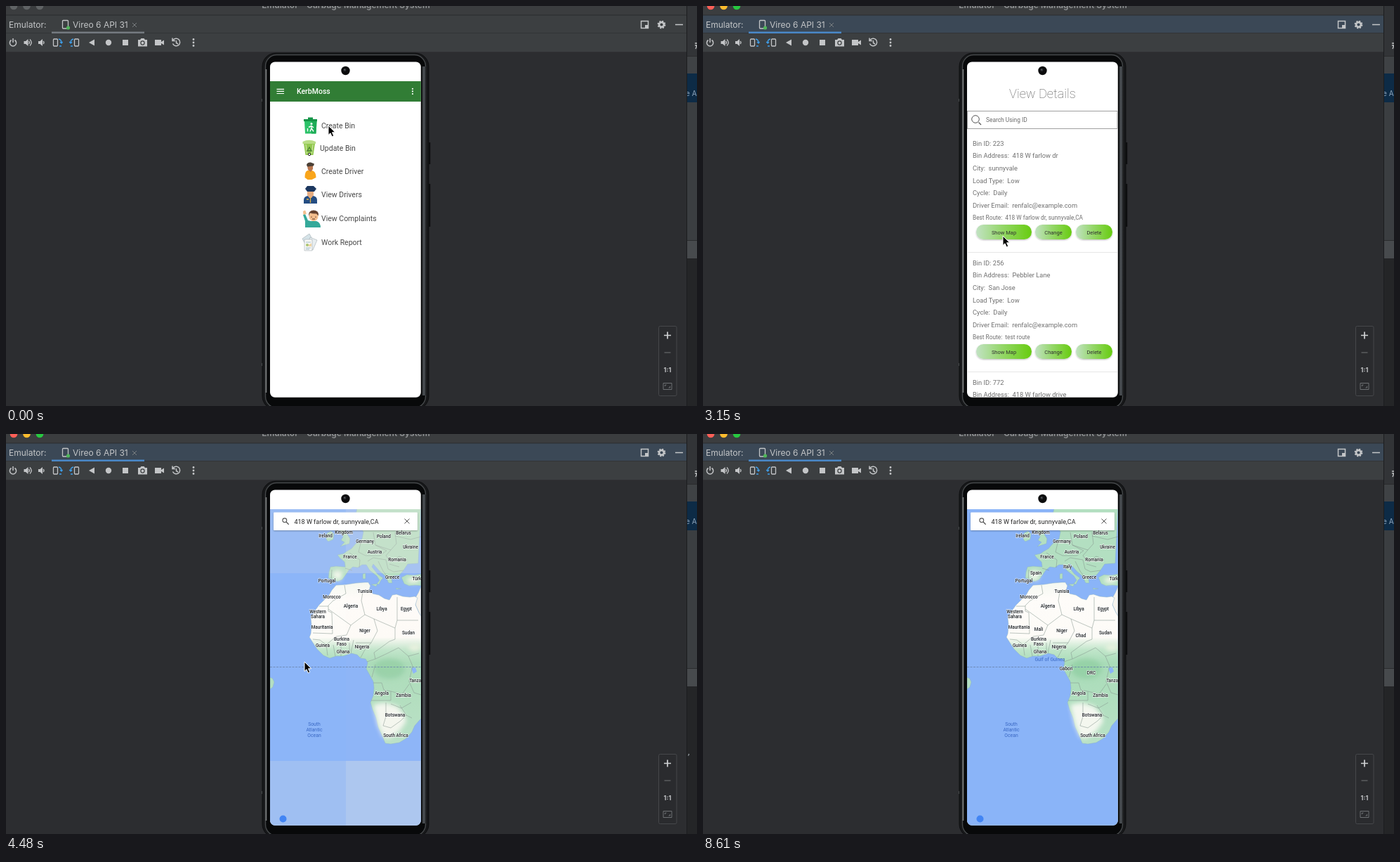
An HTML page for the animation above (9170 ms loop, 984 px wide and 569 px high).

```html
<!DOCTYPE html>
<html lang="en">
<head>
<meta charset="utf-8">
<title>Emulator</title>
<style>
  html, body { margin: 0; width: 100%; height: 100%; overflow: hidden; background: #2c2d30; }
  svg { display: block; width: 100%; height: 100%; }
  text { white-space: pre; font-family: Roboto, sans-serif; }
  .ui { font: 12px Inter, sans-serif; fill: #c3c5c7; }
  .code { font: 11px "DejaVu Sans Mono", monospace; fill: #9da4ab; }
  .menu { font-size: 10.5px; fill: #484848; }
  .row { font-size: 9.3px; fill: #6f6f6f; }
  .route { font-size: 8.3px; fill: #6f6f6f; }
  .btn { font-size: 7.5px; fill: #303030; text-anchor: middle; }
  .place { font-size: 6.4px; font-weight: 500; fill: #1f2326; text-anchor: middle;
    stroke: #fff; stroke-opacity: .75; stroke-width: 1.3px; paint-order: stroke; }
  .sea { font-size: 6.8px; fill: #3a68c4; text-anchor: middle; }
  .line { fill: none; stroke: #c3c5c7; stroke-width: 1.3; }
</style>
</head>
<body>
<svg viewBox="0 0 984 569" preserveAspectRatio="none">
  <defs>
    <clipPath id="screen"><rect x="376" y="79.500" width="214.800" height="477.200" rx="7"/></clipPath>
    <clipPath id="mapArea"><rect x="376" y="107" width="215" height="450"/></clipPath>
    <linearGradient id="lime"><stop offset="0" stop-color="#c2e2c3"/><stop offset=".45" stop-color="#96d76c"/><stop offset="1" stop-color="#67cc10"/></linearGradient>
    <linearGradient id="rim"><stop offset="0" stop-color="#2b2e30"/><stop offset=".5" stop-color="#50555a"/><stop offset="1" stop-color="#202224"/></linearGradient>
    <linearGradient id="africa" gradientUnits="userSpaceOnUse" x1="0" y1="211" x2="0" y2="441">
      <stop offset="0" stop-color="#f4f8f1"/><stop offset=".1" stop-color="#fefcf9"/><stop offset=".34" stop-color="#fdfbf7"/>
      <stop offset=".42" stop-color="#bfe5c9"/><stop offset=".5" stop-color="#a9dcb8"/><stop offset="1" stop-color="#b9e1c6"/>
    </linearGradient>
    <filter id="soft"><feGaussianBlur stdDeviation="3"/></filter>
    <filter id="shade" x="-10%" y="-20%" width="120%" height="150%"><feDropShadow dx="0" dy="1" stdDeviation="1" flood-opacity=".28"/></filter>
  </defs>

  <!-- window behind -->
  <rect x="969" width="15" height="569" fill="#2a2b2d"/>
  <rect x="970" width="14" height="71" fill="#323437"/>
  <rect x="970" y="72" width="14" height="24" fill="#3f4245"/>
  <rect x="970" y="96" width="14" height="41" fill="#0d2b46"/>
  <rect x="970" y="137" width="14" height="196" fill="#3b3e41"/>
  <rect x="970" y="334" width="14" height="25" fill="#474a4d"/>
  <rect x="970" y="359" width="14" height="210" fill="#242527"/>
  <text class="ui" x="968" y="128" style="font-size:10px;fill:#8fa6bd">e Al</text>
  <path d="M981 53h3M981 56h3l-2 5" class="line"/>
  <g id="codeText" class="code"><text x="970" y="450">ti</text><text x="970" y="491">ot:</text><text x="970" y="511">e_:</text><text x="970" y="532">ex</text></g>
  <text id="comma" class="code" x="969" y="457">,</text>

  <!-- window chrome -->
  <rect width="969" height="13" fill="#3b3d3f"/>
  <g id="lights"><circle cx="11" r="5.300"/><circle cx="29.500" r="5.300"/><circle cx="48" r="5.300"/></g>
  <text class="ui" x="484" y="3" text-anchor="middle" style="font-weight:600;fill:#929496">Emulator – Garbage Management System</text>
  <rect y="12.500" width="969" height="1" fill="#2b2d2f"/>
  <rect id="tabBar" y="13.500" width="969" height="25"/>
  <rect y="38.500" width="969" height="27" fill="#3c3f41"/>
  <path d="M0 38.500H969" stroke="#323436"/>
  <rect id="underline" x="65" y="36.500" width="132" height="2.500"/>
  <text class="ui" x="4" y="31">Emulator:</text>
  <text class="ui" x="95" y="31">Vireo 6 API 31</text>
  <rect class="line" x="80.500" y="20.500" width="8" height="11.500" rx="1"/>
  <circle cx="88.500" cy="31" r="2.600" fill="#4fb65a"/>
  <path d="M180 24l6 6m0-6l-6 6" stroke="#7b7f82" fill="none"/>
  <g class="line">
    <path d="M904.500 21.500h10v10h-10zM953 26.500h11" stroke-width="1.500"/>
    <circle cx="933.500" cy="26.500" r="3.400" stroke-width="2.600"/>
    <circle cx="933.500" cy="26.500" r="5" stroke-width="1.800" stroke-dasharray="2.200 1.730"/>
    <path d="M7.500 48.500a4.600 4.600 0 1 0 5 0M10 46v6" stroke-width="1.500"/>
    <path d="M32.500 50q2 2 0 4M34 47.500q4.500 4.500 0 9M53 50q2 2 0 4"/>
    <rect x="67.500" y="47" width="6" height="10" rx="1"/><path d="M75 47q4.500 1 4 6m-2-2l2 2 1.500-2M79 57h-3" stroke="#3f9ee8"/>
    <rect x="97.500" y="47" width="6" height="10" rx="1"/><path d="M96 47q-4.500 1-4 6m-1.800-2l2 2 1.800-2M92 57h3" stroke="#3f9ee8"/>
    <path d="M238 48.500a5.300 5.300 0 1 1-.5 5M237 45.500v4h4M242.500 49v3.500l2.500 1.500" stroke-width="1.500"/>
  </g>
  <g fill="#c3c5c7">
    <path d="M910 27h5v5h-5zM25.500 50h2.500l3.500-3v10l-3.500-3h-2.500zM46 50h2.500l3.500-3v10l-3.500-3H46zM118 52l8-4.500v9zM166 48h8v8h-8zM212 48h9v3l4-2.500v7l-4-2.500v3h-9z"/>
    <circle cx="146" cy="52" r="4.200"/>
    <path d="M188 48h3l1.500-2h4l1.500 2h3v9.500h-13z"/><circle cx="194.500" cy="52.500" r="2.600" fill="#c3c5c7" stroke="#3c3f41" stroke-width="1.200"/>
    <circle cx="267" cy="47.500" r="1.400"/><circle cx="267" cy="52" r="1.400"/><circle cx="267" cy="56.500" r="1.400"/>
  </g>
  <rect y="65.500" width="969" height="504" fill="#2c2d30"/>
  <path d="M969.500 0V569" stroke="#1c1d1f"/>

  <!-- zoom controls -->
  <rect x="929.500" y="455.500" width="25.500" height="99" rx="2" fill="#2a2b2e" stroke="#46484b"/>
  <path d="M937 468.500h10M942 463.500v10" stroke="#d0d2d4" stroke-width="1.700"/>
  <path d="M937.500 493h9" stroke="#66696c" stroke-width="1.200"/>
  <text class="ui" x="942" y="520.500" text-anchor="middle" style="font-size:9px;font-weight:700">1:1</text>
  <path d="M936 536.500h12v9h-12zM938.500 541v-2h2M945.500 541v2h-2" fill="none" stroke="#6d7073"/>

  <!-- phone -->
  <path d="M603 194v31M603 253v61" stroke="#0d0e0f" stroke-width="2.500"/>
  <rect x="365" y="67" width="237" height="507" rx="19" fill="#17181a" stroke="#0d0e0f"/>
  <rect x="369.500" y="69.500" width="228" height="502" rx="16" fill="#08090a" stroke="#45484a" stroke-width="1.400"/>
  <path d="M370.500 90V550" stroke="#7a7d7e" stroke-width="1.600"/>
  <rect x="592.500" y="86" width="5.500" height="468" fill="url(#rim)"/>
  <path d="M364.500 132v4M364.500 508v4" stroke="#45484a"/>

  <g clip-path="url(#screen)">
    <g id="menuPage">
      <rect x="366" y="70" width="236" height="500" fill="#fff"/>
      <rect x="376" y="107" width="215" height="29" fill="#317d35"/>
      <path d="M385.500 118.300h10.500M385.500 121.400h10.500M385.500 124.500h10.500" stroke="#fff" stroke-width="1.200"/>
      <text x="414" y="125" style="font-size:10.500px;font-weight:500;fill:#fff">KerbMoss</text>
      <g fill="#fff"><circle cx="579" cy="117.800" r="1.100"/><circle cx="579" cy="121.400" r="1.100"/><circle cx="579" cy="125" r="1.100"/></g>
      <!-- bins -->
      <path d="M424 161h19v3h-19zM430 158.500h7v3h-7z" fill="#159548"/><path d="M425 164h17.500l-1 17.500h-15.500z" fill="#2bc268"/><path d="M435 164h7.500l-1 17.500h-6.500z" fill="#1dac57"/>
      <circle cx="435" cy="167.500" r="1.500" fill="#fff"/><path d="M435 170v4l-2 4.500M435 174l3 4.500M431 172.500l4-2 3 2.500M429.500 174v4.500" stroke="#fff" stroke-width="1.400" fill="none"/>
      <path d="M424 196h16l-2.500 16h-11z" fill="#93c950"/><path d="M422.500 193q9-4.500 18.500 0v3h-18.500z" fill="#b9dd86"/><path d="M427 197l1.500 13M437 197l-1.500 13" stroke="#d5eab3"/>
      <path d="M429 206l3-5 3 5z" fill="none" stroke="#488330" stroke-width="1.400"/><circle cx="432" cy="211" r="1.700" fill="#fff" stroke="#222"/>
      <!-- people -->
      <path d="M425.500 244q0-9 4-10h6q6 1 6 10l-6 3h-6z" fill="#f9a51b"/><path d="M429 227h8v5l-3 4-4-3z" fill="#b9764f"/><path d="M428 226q1-4 6-3.500l5 2-1 3-9 1z" fill="#4b4036"/>
      <path d="M424 281v-5q0-5 6-6h7q6 1 6 6v5z" fill="#244d83"/><path d="M429 264h9v5l-3 4h-3l-3-4z" fill="#e6ad82"/><path d="M426 260l3-4h9l4 4-3 4h-10z" fill="#1c375f"/><path d="M433.500 272v8M428 275h3" stroke="#e5b648" stroke-width="1.300"/>
      <path d="M426 315v-9l-3-9 3-1 4 9 4 1h8q6 2 6 9z" fill="#35a99a"/><path d="M423.500 297l-.5-5 3-1.500 2 5z" fill="#f4be8d"/><circle cx="438" cy="299.500" r="6.500" fill="#f4be8d"/><path d="M431 299q-1-8 7-8.500 8 .5 7 8l-3-3q-6 0-9-1z" fill="#654230"/><path d="M435 299.500v1.500M441 299.500v1.500M436 303h4" stroke="#5b3428"/>
      <!-- documents -->
      <g stroke="#a3adb2" stroke-width=".6"><path d="M422 331l10-7 7 13-10 7z" fill="#d5e3e8"/><path d="M433 329l10 4-6 14-9-4z" fill="#e8eef0"/><path d="M425 332h11v16h-11z" fill="#f7f8f6"/></g>
      <path d="M427 336h7M427 344h7M427 346h5" stroke="#8eb0c0" stroke-width=".8"/><circle cx="429" cy="340" r="2" fill="#a9c46e"/><path d="M432 342v-3M434 342v-4" stroke="#eab254"/>
      <g id="menuText"></g>
    </g>
    <rect id="menuScrim" x="366" y="70" width="236" height="500"/>

    <g id="listPage">
      <rect x="376" y="79" width="215" height="478" fill="#fff"/>
      <text x="483.500" y="131" text-anchor="middle" style="font-size:18.200px;font-weight:100;fill:#555">View Details</text>
      <rect x="376.500" y="149.500" width="213.500" height="25" fill="#fff" stroke="#a0a0a0"/>
      <path d="M392.500 165.500l3.500 3.500" stroke="#555" stroke-width="1.200"/><circle cx="388" cy="161" r="5.300" fill="none" stroke="#555"/>
      <text x="403" y="165" style="font-size:8.400px;fill:#6a6a6a">Search Using ID</text>
      <g id="cards"></g>
      <rect id="press" x="389" y="311" width="79" height="21" rx="10.500" fill="#174000"/>
    </g>
    <rect id="listScrim" x="366" y="70" width="236" height="500"/>

    <g id="mapPage">
      <rect x="376" y="79" width="215" height="478" fill="#fff"/>
      <g clip-path="url(#mapArea)">
        <rect x="376" y="107" width="215" height="450" fill="#8ab4f8"/>
        <g id="land" stroke="#87afc9" stroke-width=".5" fill="#b3dfc1">
          <path d="M376 346l4 2 2 5-2 7-4 3z"/>
          <path d="M457 141l6-3 4 4-1 8-7 3-3-3zM474 134l8-2 3 9 5 8-1 7-13 4 6-6-5-3 3-5z"/>
          <path d="M591 105H500l-4 20 9 9 4 5-2 10-9 7-6 7-7 4-4 3-9 2 3 4 7 6 1 7-13-1-8 1-2 7-1 9 7 2 6 3 7-3 5-7 4-6 6-5 7 1 6-4 6 0 5 8 10 8 4 6-4 5 3 1 3-6 3-3-8-6-8-10 2-4 9 10 8 7 5 10 5 0-1-7 2-3 9-1 6-7 6-9 15-1z"/>
          <path d="M563 204l8-4 10 1 10-2v17l-8-1-9 1-7-3zM520 214l9-1-2 4zM508 199l4-1 0 8-4 0zM555 219l8 1-7 1z"/>
          <path d="M583 233l4-7 4-9v44l-8-18z" fill="#f6f3ec"/>
          <path id="coast" fill="url(#africa)" d="M470 215l-6 7-4 7-7 7-7 7-6 8-6 11 1 10-1 12-2 5 5 8 6 9 9 9 9 4 9-3h10l12-4 8 2 5 5 7 1 3 5-2 9 5 9 5 9 1 9-1 11-4 10 3 10 5 12 3 13 6 13 4 10 8 1 12-2 10-6 8-9 4-9 6-7 6-6V264l-6-10-5-11 3-10-4-2-7 1-10-1-9-3-6 1-4 7-7-2-8-5-9-2-5-5 2-6-3-5h-5l-13 1-13 2z"/>
        </g>
        <g filter="url(#soft)">
          <ellipse cx="546" cy="334" rx="22" ry="14" fill="#8dceA0" opacity=".7"/>
          <path d="M523 385l16-3 18 5 10 12 3 10-10 14-15 10-8-2-8-18z" fill="#fbfaf4" opacity=".9"/>
          <ellipse cx="582" cy="304" rx="9" ry="5" fill="#e8f2df"/>
          <path d="M462 200l10-7 8 5-5 12z" fill="#f2f6eb"/>
          <ellipse cx="580" cy="208" rx="9" ry="4" fill="#f4f6ec"/>
        </g>
        <path d="M577 333l6-1 2 6-5 3z" fill="#8ab4f8"/>
        <g fill="none" stroke="#879690" stroke-width=".55">
          <path d="M482 215l2 12-18 10-7 7v5l32 23 20-15-5-20 2-12M446 245h13M459 249v3l5 2 1 30-28-1M437 292l10 1 9 7 14-12 15-2 6-14M495 293l-4 19M511 257l13 6 5 17-9 17h-22M524 263l30 13v16l-8 3M557 232v33h30M554 276l3-11"/>
          <path d="M520 297l-9 10-6 11M546 295l-22 16 2 9-12 4M526 320l17-8 16-8 14 12 15-4M526 328l-5 18M573 316l6 14-5 22M523 354l12 0 3 10 10 2v13h-28M548 366l16 4 10-14M548 384l15 6 14-8M541 382v20l-4 13 11 3 14-10 8-8-9-14M574 352l7 16 10 3M570 400l8 4M466 300l3 16M477 298v18M489 297v15M456 300l2 15"/>
          <path d="M464 193l-1 18M483 191l10 3M489 169l15 10-1 11M506 151l-4 17 10 5h20l10-7-16-8-3-18M526 158l22 7 8-9-2-16M548 165l-7 8 7 9 12-8 11 5M515 181l8-5 18 3 3 13 8 4 14-2M554 145l22 5 15-4M530 181l7 14 6 8M546 185l14 4"/>
        </g>
        <path d="M376 331.500H591" stroke="#6782aa" stroke-width=".8" stroke-dasharray="3 1.500"/>
        <g id="tiles" fill="#ece8e0"></g>
        <g id="places"></g>
        <g id="latePlaces"></g>
        <circle cx="394.500" cy="547.500" r="5" fill="#4285f4"/>
      </g>
      <rect x="381" y="111.500" width="205" height="25.500" rx="1" fill="#fff" filter="url(#shade)"/>
      <circle cx="396.800" cy="122.800" r="2.900" fill="none" stroke="#555" stroke-width="1.100"/><path d="M399 125l3.700 3.700" stroke="#555" stroke-width="1.300"/>
      <text x="410.500" y="127.700" style="font-size:9px;fill:#252525">418 W farlow dr, sunnyvale,CA</text>
      <path d="M567.500 120.500l7 7m0-7l-7 7" stroke="#555"/>
    </g>
    <circle cx="483.500" cy="92" r="6.200" fill="#0b0c0d"/><circle cx="482.500" cy="91" r="2" fill="#2c3034"/><circle cx="482" cy="90.500" r=".7" fill="#777"/>
  </g>

  <path id="cursor" d="M0 0V13.500L3 10.800 5.200 15.800 7.700 14.700 5.500 9.800H9.700Z" fill="#000" stroke="#fff" stroke-width="1"/>
</svg>
<script>
const $ = id => document.getElementById(id);
const LOOP = 9170, STEP = 70;
const clamp = v => Math.max(0, Math.min(1, v));
const text = (cls, x, y, s) => `<text class="${cls}" x="${x}" y="${y}">${s}</text>`;
const show = (id, on) => $(id).setAttribute('display', on ? 'inline' : 'none');
const fade = (id, a) => $(id).setAttribute('opacity', a);
const zoom = (id, s) => $(id).setAttribute('transform', `translate(483.5 320) scale(${s}) translate(-483.5 -320)`);

$('menuText').innerHTML = [['Create Bin', 174], ['Update Bin', 206], ['Create Driver', 239],
  ['View Drivers', 272], ['View Complaints', 306], ['Work Report', 340]]
  .map(([s, y]) => text('menu', s === 'Update Bin' ? 447 : 449, y, s)).join('');

const button = (x, w, label) =>
  `<rect x="${x}" y="311" width="${w}" height="21" rx="10.5" fill="url(#lime)" filter="url(#shade)"/>` +
  text('btn', x + w / 2, 324.5, label);

function card([id, address, city, route], i) {
  const rows = ['Bin ID: ' + id, 'Bin Address:  ' + address, 'City:  ' + city, 'Load Type:  Low',
    'Cycle:  Daily', 'Driver Email:  renfalc@example.com'];
  return `<g transform="translate(0 ${i * 170})">` +
    rows.map((s, n) => text('row', 384, 198.5 + n * 17.7, s)).join('') +
    text('route', 384, 303.7, 'Best Route:  ' + route) +
    button(389, 79, 'Show Map') + button(473, 52, 'Change') + button(531, 52, 'Delete') +
    '<path d="M377 350.5H590" stroke="#e6e6e6"/></g>';
}
$('cards').innerHTML = [
  [223, '418 W farlow dr', 'sunnyvale', '418 W farlow dr, sunnyvale,CA'],
  [256, 'Pebbler Lane', 'San Jose', 'test route'],
  [772, '418 W farlow drive', 'sunnyvale', 'test route']
].map(card).join('');

const place = ([s, x, y, cls = 'place']) => text(cls, x, y + 2.3, s);
$('places').innerHTML = [
  ['Ireland', 455, 145], ['Kingdom', 481, 140], ['Germany', 511, 153], ['Poland', 538, 146], ['Belarus', 566, 141],
  ['Ukraine', 576, 161], ['Austria', 525, 168], ['France', 490, 175], ['Romania', 557, 179], ['Greece', 550, 204],
  ['Portugal', 457, 209], ['Türkiye', 589, 206], ['Tunisia', 511, 224], ['Morocco', 464, 232], ['Algeria', 491, 245],
  ['Libya', 535, 249], ['Egypt', 570, 249], ['Western', 444, 253], ['Sahara', 444, 260], ['Mauritania', 450, 275],
  ['Niger', 511, 280], ['Sudan', 573, 283], ['Burkina', 478, 292], ['Faso', 478, 299], ['Guinea', 451, 301],
  ['Nigeria', 507, 303], ['Ghana', 480, 310], ['Tanzania', 587, 351], ['Angola', 535, 369], ['Zambia', 566, 372],
  ['Botswana', 554, 400], ['South Africa', 555, 429],
  ['South', 439, 413, 'sea'], ['Atlantic', 439, 421, 'sea'], ['Ocean', 439, 429, 'sea']
].map(place).join('');
$('latePlaces').innerHTML = [
  ['Spain', 474, 198], ['Italy', 519, 189], ['Mali', 478, 278], ['Chad', 538, 287],
  ['Gabon', 517, 334], ['DRC', 553, 340], ['Gulf of Guinea', 494, 321, 'sea']
].map(place).join('');

// Map tiles: x, y, width, height, veil left at 4480 ms
const tiles = [[376, 107, 108, 91, .17], [484, 107, 107, 91, .3], [376, 198, 108, 267, .02],
  [484, 198, 107, 267, .04], [376, 465, 108, 92, .22], [484, 465, 107, 92, .36]];
$('tiles').innerHTML = tiles.map(([x, y, w, h]) => `<rect x="${x}" y="${y}" width="${w}" height="${h}"/>`).join('');
const veils = [...$('tiles').children];

// Pointer stops: time, x, y
const stops = [[0, 459, 170], [350, 466, 215], [630, 480, 285], [980, 466, 202], [1190, 466, 202],
  [1610, 558, 226], [1750, 558, 226], [2030, 445, 227], [2240, 445, 227], [2450, 438, 340], [2730, 438, 340],
  [2940, 432, 329], [3010, 432, 329], [3150, 427, 327], [3710, 427, 327], [3780, 421, 323], [3850, 425, 324],
  [5040, 425, 324], [5320, 577, 138], [5530, 552, 215], [5810, 552, 215], [6160, 540, 462], [6440, 458, 340],
  [6790, 517, 203], [7070, 495, 181], [7350, 462, 305], [7630, 517, 218], [7840, 517, 218], [8050, 332, 410],
  [8260, 493, 551], [8470, 493, 551], [8610, 496, 580], [LOOP, 496, 580]];

function pointer(t) {
  const i = stops.findIndex(s => s[0] > t);
  const [t0, x0, y0] = stops[i - 1], [t1, x1, y1] = stops[i];
  const u = (t - t0) / (t1 - t0), e = u * u * (3 - 2 * u);
  return [x0 + (x1 - x0) * e, y0 + (y1 - y0) * e];
}

// A new page grows into place while the old one swells and dims.
function openPage(t, start, from, oldId, scrimId, newId) {
  const on = t >= from, u = clamp((t - start) / 450), e = on ? 1 - (1 - u) ** 4 : 0;
  show(oldId, e < 1);
  zoom(oldId, 1 + .05 * e);
  fade(scrimId, e < 1 ? .1 * e : 0);
  show(newId, on);
  zoom(newId, .85 + .15 * e);
  fade(newId, clamp(u * 6));
}

function draw(now) {
  const t = Math.floor((now % LOOP) / STEP) * STEP;
  const active = t >= 280;
  ['#ff5f57', '#febc2e', '#28c840'].forEach((c, i) =>
    $('lights').children[i].setAttribute('fill', active ? c : '#606365'));
  $('tabBar').setAttribute('fill', active ? '#3b4856' : '#3c3f41');
  $('underline').setAttribute('fill', active ? '#4a88c7' : '#747a80');

  openPage(t, 1470, 1470, 'menuPage', 'menuScrim', 'listPage');
  if (t >= 3900) openPage(t, 3909, 4130, 'listPage', 'listScrim', 'mapPage');
  else { show('mapPage', false); fade('listScrim', 0); }
  fade('press', t > 3150 && t < 3570 ? .16 * Math.sin(Math.PI * (t - 3150) / 420) : 0);

  tiles.forEach(([, , , , left], i) => {
    const a = t < 4270 ? 1 : clamp(left - (t - 4480) / 280);
    veils[i].setAttribute('opacity', a);
  });
  show('places', t >= 4410);
  show('latePlaces', t >= 4620);
  show('codeText', t >= 4130 && t < 4270);
  show('comma', t >= 4270 && t < 4620);

  $('cursor').setAttribute('transform', `translate(${pointer(t)})`);
  requestAnimationFrame(() => draw(performance.now() - begin));
}
const begin = performance.now();
draw(0);
</script>
</body>
</html>
```
